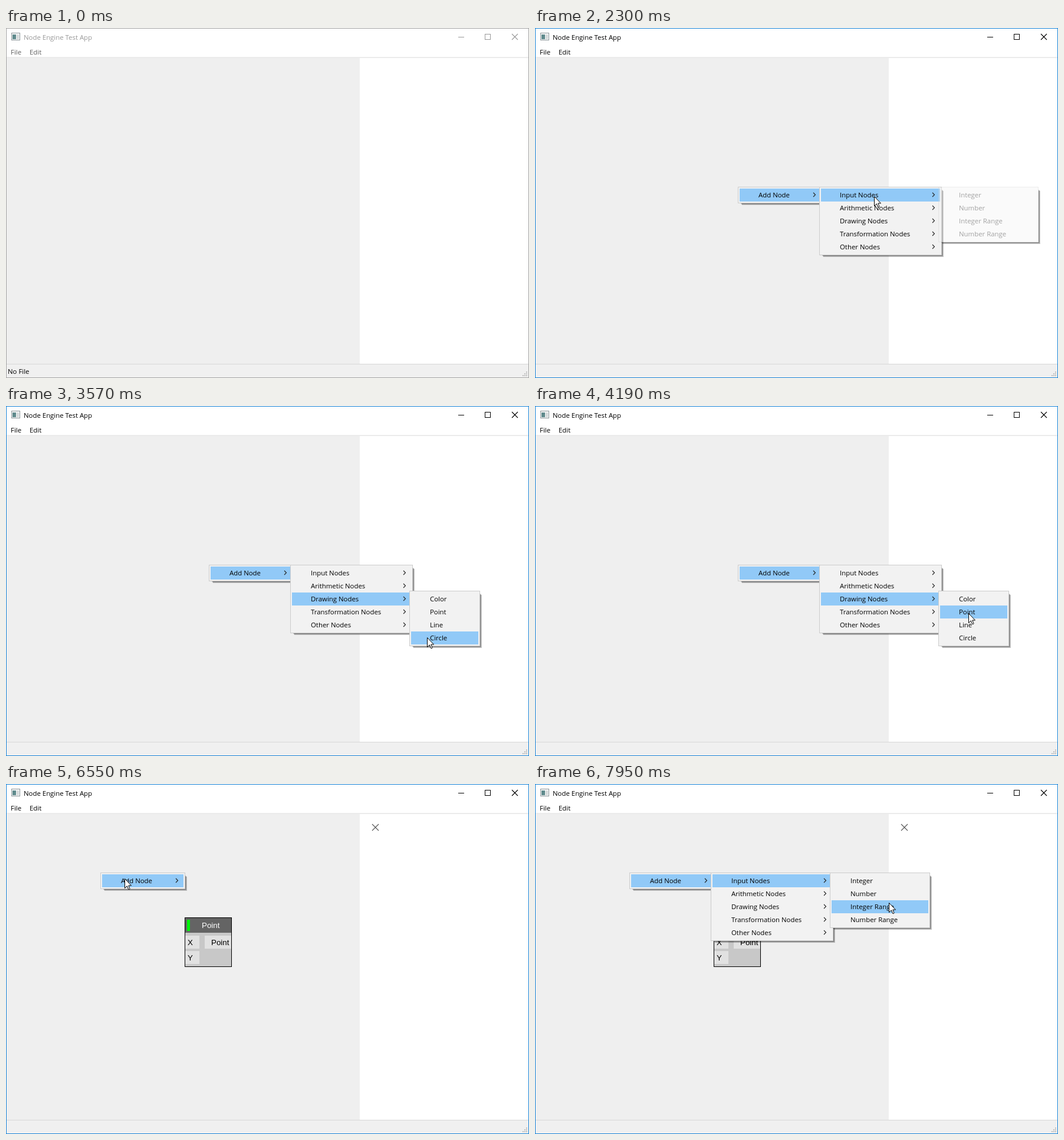
Recreate the animation shown at these times as an HTML page. Size 887 px wide and 593 px high, loop 8000 ms.

```html
<!DOCTYPE html>
<html lang="en">
<head>
<meta charset="utf-8">
<title>Node Engine Test App</title>
<style>
  html, body { margin: 0; width: 100%; height: 100%; overflow: hidden; background: #fff; }
  svg { display: block; width: 887px; height: 593px; }
  text { font: 11.4px "Open Sans", "Noto Sans", sans-serif; white-space: pre; }
  .node text { font: 13.33px "Liberation Sans", Arial, sans-serif; }
</style>
</head>
<body>
<svg id="stage" viewBox="0 0 887 593"></svg>
<script>
const LOOP = 8000, STEP = 77;          // the screen refreshes once per STEP
const ACTIVATE = 990, PICK = 4590;     // window gets focus; "Point" is chosen
const ROW = 22, PAD = 3;
const stage = document.getElementById('stage');

// Pointer glides: each eases from the previous stop to x, y
const home = { x: 667, y: 540 };
const glide = (from, to, x, y) => ({ from, to, x, y });
const glides = [
  glide(70, 760, 344, 269),
  glide(1160, 1314, 385, 285),
  glide(1770, 2130, 575, 285),
  glide(2450, 2850, 577, 323),
  glide(3250, 3620, 725, 398),
  glide(3620, 4040, 735, 351),
  glide(PICK, 5050, 519, 309),
  glide(5130, 5590, 160, 150),
  glide(6160, 6460, 201, 160),
  glide(6700, 7160, 339, 166),
  glide(7330, 7900, 600, 201)
];

const menuType = (w, arrows, ...items) => ({ w, arrows, items, h: items.length * ROW + 2 * PAD });
const add = menuType(144, true, 'Add Node');
const kinds = menuType(208, true, 'Input Nodes', 'Arithmetic Nodes', 'Drawing Nodes', 'Transformation Nodes', 'Other Nodes');
const inputs = menuType(170, false, 'Integer', 'Number', 'Integer Range', 'Number Range');
const drawing = menuType(120, false, 'Color', 'Point', 'Line', 'Circle');

const popup = (type, x, y, open, close) => ({ ...type, x, y, open, close });
const submenu = (type, parent, row, open, close = parent.close) => ({
  ...popup(type, parent.x + parent.w - 6, parent.y + row * ROW, open, close), parent, row
});
const add1 = popup(add, 344, 269, 1160, PICK);
const kinds1 = submenu(kinds, add1, 0, 1690);
const add2 = popup(add, 160, 150, 5920, LOOP);
const kinds2 = submenu(kinds, add2, 0, 6620);
const menus = [
  add1, kinds1, submenu(inputs, kinds1, 0, 2300, 2770), submenu(drawing, kinds1, 2, 3090),
  add2, kinds2, submenu(inputs, kinds2, 0, 7330)
];

const rect = (x, y, w, h, fill) => `<rect x="${x}" y="${y}" width="${w}" height="${h}" fill="${fill}"/>`;
const frame = (x, y, w, h, color, fill = 'none') =>
  `<rect x="${x + .5}" y="${y + .5}" width="${w - 1}" height="${h - 1}" fill="${fill}" stroke="${color}"/>`;
const line = (d, color, width = 1) => `<path d="${d}" fill="none" stroke="${color}" stroke-width="${width}"/>`;
const label = (x, y, s, fill = '#000') => `<text x="${x}" y="${y}" fill="${fill}">${s}</text>`;
const cross = (x, y, size, color) =>
  line(`M${x} ${y}l${size} ${size}m0-${size}l-${size} ${size}`, color, 1.1);

function pointerAt(t) {
  const i = glides.findLastIndex(g => t >= g.from);
  if (i < 0) return null;
  const a = glides[i - 1] || home, b = glides[i];
  const passed = Math.floor((t - b.from) / STEP) * STEP;
  const k = t >= b.to ? 1 : passed / (b.to - b.from);
  const e = k * k * (3 - 2 * k);
  return { x: Math.round(a.x + (b.x - a.x) * e), y: Math.round(a.y + (b.y - a.y) * e) };
}

function windowFrame(active) {
  const ink = active ? '#000' : '#999';
  const bar = active ? '#000' : '#5f5f5f';
  let s = rect(0, 0, 887, 593, '#fff')
    + rect(1, 49, 885, 2, '#ebebeb')
    + rect(1, 51, 599, 518, '#efefef')
    + rect(1, 569, 885, 23, '#f0f0f0')
    + rect(1, 569, 885, 1, '#d7d7d7');
  for (let r = 0; r < 3; r++)
    for (let c = 0; c <= r; c++) s += rect(882 - 3 * c, 582 + 3 * r, 2, 2, '#bfbfbf');
  s += frame(9, 8, 15, 13, '#8d979b', '#f5f6f6')
    + rect(11, 11, 6, 8, '#5f8a8c') + rect(18, 11, 4, 8, '#d5dadb')
    + label(30, 20, 'Node Engine Test App', ink)
    + label(8, 45, 'File', bar) + label(40, 45, 'Edit', bar)
    + line('M767 15.5h10', ink) + frame(812, 10, 10, 10, ink) + cross(858, 10, 10, ink);
  return s + frame(0, 0, 887, 593, active ? '#1883d7' : '#a3a3a3');
}

function pointNode() {
  const slot = (x, y, w, name) => rect(x, y, w, 22, '#e1e1e1') + label(x + (w > 30 ? 11 : 4), y + 16, name);
  return '<g class="node">' + frame(303, 226, 80, 84, '#000', '#c8c8c8')
    + rect(304, 227, 78, 25, '#646464') + rect(307, 230, 5, 19, '#00f50a')
    + label(332, 244, 'Point', '#fff')
    + slot(304, 257, 24, 'X') + slot(304, 283, 24, 'Y') + slot(337, 257, 45, 'Point') + '</g>'
    + cross(621, 68, 11, '#555');
}

function drawMenu(m, t, selected) {
  const { x, y, w, h } = m, r = x + w, b = y + h;
  let s = '';
  for (let i = 1; i <= 3; i++)
    s += `<path d="M${r} ${y + 4 + i}H${r + i}V${b + i}H${x + 4 + i}V${b}H${r}Z" opacity=".2"/>`;
  const fade = Math.min(1, .36 * (1 + Math.floor((t - m.open) / STEP)));
  s += `<g opacity="${fade}">` + frame(x, y, w, h, '#ccc', '#f2f2f2');
  m.items.forEach((name, i) => {
    const top = y + PAD + i * ROW;
    if (i === selected) s += rect(x + PAD, top, w - 2 * PAD, ROW, '#91c9f7');
    s += label(x + 35, top + 15, name);
    if (m.arrows) s += line(`M${r - 16} ${top + 7}l3.5 3.5-3.5 3.5`, '#222', 1.1);
  });
  return s + '</g>';
}

const arrow = ({ x, y }) => `<path transform="translate(${x} ${y})" fill="#fff" stroke="#000"
  d="M.5.5V16.5L4.3 12.8L6.8 18.5H8.5L9 17.5L6.8 12H11.5Z"/>`;

function scene(t) {
  const p = pointerAt(t);
  const open = menus.filter(m => t >= m.open && t < m.close);
  const hit = p && open.findLast(m =>
    p.x >= m.x && p.x < m.x + m.w && p.y >= m.y && p.y < m.y + m.h);

  // The row under the pointer wins; otherwise the row of the open child stays lit.
  const rows = open.map(m => {
    if (m === hit && p.x >= m.x + PAD && p.y >= m.y + PAD)
      return Math.min(m.items.length - 1, Math.floor((p.y - m.y - PAD) / ROW));
    const child = open.find(c => c.parent === m);
    return child ? child.row : -1;
  });

  let s = windowFrame(t >= ACTIVATE);
  if (rows.every(r => r < 0)) s += label(3, 586, 'No File');
  if (t >= PICK) s += pointNode();
  open.forEach((m, i) => { s += drawMenu(m, t, rows[i]); });
  return p ? s + arrow(p) : s;
}

const start = performance.now();
let shown = '';
function play() {
  const next = scene((performance.now() - start) % LOOP);
  if (next !== shown) stage.innerHTML = shown = next;
  requestAnimationFrame(play);
}
play();
</script>
</body>
</html>
```
